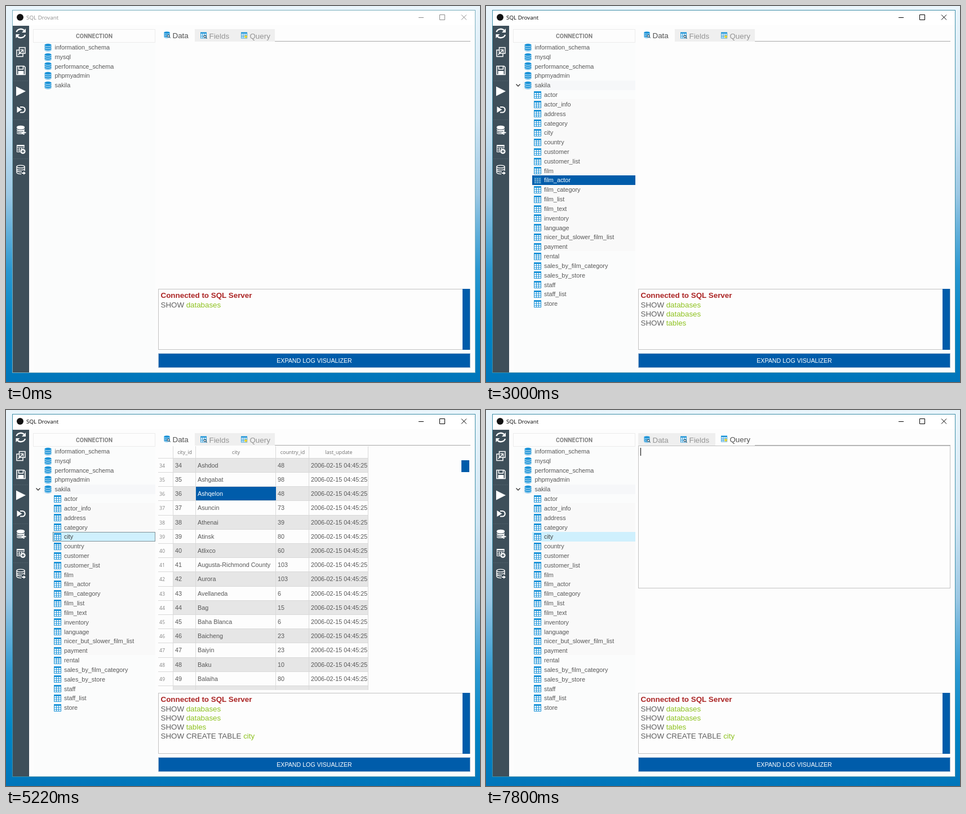
Animation of 841 by 666 pixels, one loop 8 s. Source, as an HTML page:

```html
<!DOCTYPE html>
<html lang="en">
<head>
<meta charset="utf-8">
<title>Database browser</title>
<style>
html, body { margin: 0; width: 841px; height: 666px; overflow: hidden; }
svg { display: block; font-family: "Liberation Sans", Arial, sans-serif; }
text { white-space: pre; }
.ui { font-family: "Open Sans", "Noto Sans", sans-serif; }
.head { font-family: Roboto, sans-serif; font-weight: 700; }
</style>
</head>
<body>
<svg id="stage" width="841" height="666" viewBox="0 0 841 666">
  <defs>
    <linearGradient id="sky" x2="0" y2="1">
      <stop offset="0" stop-color="#eaf5fb"/>
      <stop offset=".3" stop-color="#cfe5f3"/>
      <stop offset=".5" stop-color="#9cc8e4"/>
      <stop offset=".7" stop-color="#2b98d1"/>
      <stop offset=".85" stop-color="#0086c6"/>
      <stop offset="1" stop-color="#0075ba"/>
    </linearGradient>
    <clipPath id="pane"><path d="M270 41H825V496H270Z"/></clipPath>
    <g id="db">
      <path d="M-6 -4.5V4.5A6 2.2 0 0 0 6 4.5V-4.5Z" fill="#1a93d8"/>
      <ellipse cy="-4.5" rx="6" ry="2.2" fill="#1a93d8"/>
      <path d="M-6 -3.6A6 2.2 0 0 0 6 -3.6M-6 -.2A6 2.2 0 0 0 6 -.2M-6 3.2A6 2.2 0 0 0 6 3.2" fill="none" stroke="#fff" stroke-width=".9"/>
    </g>
    <g id="table">
      <rect x="-6.5" y="-6.5" width="13" height="13" fill="#1a93d8"/>
      <path d="M-4 -3.5V5.5M0 -3.5V5.5M4 -3.5V5.5" stroke="#fff" stroke-width="3" stroke-dasharray="2.33 1"/>
    </g>
    <g id="lens" fill="#fff" stroke="#3b5566" stroke-width="1.2">
      <path d="M1.5 1.5L4 4"/><circle r="2.1"/>
    </g>
  </defs>
  <rect width="841" height="666" fill="url(#sky)"/>
  <g id="frame"></g>
  <g id="still"></g>
  <g id="tree"></g>
  <g id="main" clip-path="url(#pane)"></g>
  <g id="log"></g>
</svg>
<script>
const LOOP = 8000, BLUE = '#005caa', GREEN = '#8ec21f', INK = '#585858';
const $ = id => document.getElementById(id);
const esc = s => String(s).replace(/&/g, '&amp;').replace(/</g, '&lt;');
const rect = (x, y, w, h, fill, more = '') =>
  `<rect x="${x}" y="${y}" width="${w}" height="${h}" fill="${fill}" ${more}/>`;
const text = (x, y, s, size, fill, more = '') =>
  `<text x="${x}" y="${y}" font-size="${size}" fill="${fill}" ${more}>${esc(s)}</text>`;
const line = (d, color, more = '') => `<path d="${d}" fill="none" stroke="${color}" ${more}/>`;
const use = (id, x, y, scale = 1) => `<use href="#${id}" transform="translate(${x} ${y}) scale(${scale})"/>`;
const mid = 'text-anchor="middle"';

const bases = 'information_schema mysql performance_schema phpmyadmin sakila'.split(' ');
const tables = ('actor actor_info address category city country customer customer_list film film_actor ' +
  'film_category film_list film_text inventory language nicer_but_slower_film_list payment rental ' +
  'sales_by_film_category sales_by_store staff staff_list store').split(' ');
const cities = ('A Corua (La Corua):87,Abha:82,Abu Dhabi:101,Acua:60,Adana:97,Addis Abeba:31,Aden:107,Adoni:44,' +
  'Ahmadnagar:44,Akishima:50,Akron:103,al-Ayn:101,al-Hawiya:82,al-Manama:11,al-Qadarif:89,al-Qatif:82,' +
  'Alessandria:49,Allappuzha (Alleppey):44,Allende:60,Almirante Brown:6,Alvorada:15,Ambattur:44,Amersfoort:67,' +
  'Amroha:44,Angra dos Reis:15,Anpolis:15,Antofagasta:22,Aparecida de Goinia:15,Apeldoorn:67,Araatuba:15,' +
  'Arak:46,Arecibo:77,Arlington:103,Ashdod:48,Ashgabat:98,Ashqelon:48,Asuncin:73,Athenai:39,Atinsk:80,' +
  'Atlixco:60,Augusta-Richmond County:103,Aurora:103,Avellaneda:6,Bag:15,Baha Blanca:6,Baicheng:23,Baiyin:23,' +
  'Baku:10,Balaiha:80,Balikesir:97,Balurghat:44,Bamenda:19,Bandar Seri Begawan:16,Banjul:37,Barcelona:104,' +
  'Basel:91,Bat Yam:48,Batman:97,Batna:2,Battambang:18').split(',').map((s, i) => {
    const [name, country] = s.split(':');
    return [i + 1, name, country, '2006-02-15 04:45:25'];
  });
const fields = [
  ['city_id', 'smallint(5) unsigned', 'NO', 'PRI', 'None', 'auto_increment'],
  ['city', 'varchar(50)', 'NO', '', 'None', ''],
  ['country_id', 'smallint(5) unsigned', 'NO', 'MUL', 'None', ''],
  ['last_update', 'timestamp', 'NO', '', 'CURRENT_TIMESTAMP', 'on update CURRENT_TIMESTAMP']];
const ddl = [
  'CREATE TABLE `city` (',
  '`city_id` SMALLINT ( 5 ) UNSIGNED NOT NULL AUTO_INCREMENT ,',
  '`city` VARCHAR ( 50 ) NOT NULL ,',
  '`country_id` SMALLINT ( 5 ) UNSIGNED NOT NULL ,',
  '`last_update` timestamp NOT NULL DEFAULT current_timestamp ON UPDATE current_timestamp ,',
  'PRIMARY KEY ( `city_id` ) ,',
  'KEY `idx_fk_country_id` ( `country_id` ) ,',
  'CONSTRAINT `fk_city_country` FOREIGN KEY ( `country_id` ) REFERENCES `country` ( `country_id` ) ON',
  'UPDATE cascade',
  ')',
  'ENGINE = INNODB AUTO_INCREMENT = 601 DEFAULT',
  'CHARSET = UTF8'];

// Timelines: [time, value] steps
const treeHover = [[0, null], [780, -1], [1680, null], [1920, -1], [2040, 0], [2100, 1],
  [2280, 3], [2340, 5], [2400, 7], [2460, 9], [2520, 11], [2580, 13], [2640, 16], [2760, 14],
  [2940, 12], [3000, 9], [3060, 7], [3120, 5], [3180, 3], [3240, 2], [3300, 1], [3480, 2], [3540, 3],
  [3600, 5], [3660, 6], [3720, 8], [3780, 7], [3840, 6], [3900, 5], [3960, 4], [4140, null], [4500, 6], [4620, null]];
const treePick = [[0, null], [1680, -1], [1920, null], [4140, 4]];
const firstRow = [[0, 1], [4800, 4], [4860, 10], [4920, 13], [4980, 19], [5040, 22], [5160, 28], [5220, 34], [5280, 43]];
const cellHover = [[0, ''], [4620, '5,0'], [4680, '2,1'], [5340, '1,1'], [5400, '0,1'], [5460, ''],
  [5940, '0,1'], [6000, '1,1'], [6240, '2,0'], [6420, '3,0'], [6480, ''],
  [6960, '3,1'], [7020, '2,1'], [7080, '1,2'], [7140, '0,3'], [7200, '']];
const tabAt = [[0, 0], [5760, 1], [7440, 2]];
const logCount = [[0, 1], [1860, 2], [1920, 3], [4320, 4]];
const at = (steps, t) => {
  let v = steps[0][1];
  for (const [time, value] of steps) if (t >= time) v = value;
  return v;
};

function frame(active) {
  const c = active ? '#000' : '#8c8c8c';
  return rect(11.5, 7.5, 821, 642, '#fdfdfd', `stroke="${active ? '#3f8fa8' : '#79aebd'}"`) +
    rect(12, 8, 820, 26, '#fff') +
    '<circle cx="25" cy="20" r="6" fill="#111"/>' +
    text(36, 24, 'SQL Drovant', 9.8, c, 'class="ui"') +
    line('M732 20.5H741M769.5 15.5H778.5V24.5H769.5ZM808 15.5L817 24.5M817 15.5L808 24.5', c);
}

function still() {
  const w = (d, width = 1.7) => line(d, '#fff', `stroke-width="${width}"`);
  const solid = d => `<path d="${d}" fill="#fff"/>`;
  const dark = (d, width) => line(d, '#3e4f5a', `stroke-width="${width}"`);
  let s = rect(12, 35, 29, 614, '#3e4f5a');
  for (const y of [132.5, 201.5, 270.5]) s += line(`M13 ${y}H40`, '#4f606b', 'stroke-dasharray="2 1"');
  // refresh, open, save
  s += w('M18.5 46A8 7 0 0 1 32 43M34 51A8 7 0 0 1 20.5 54', 2.4) +
    solid('M35 40V47H28ZM17.5 57V50H24.5Z') +
    w('M23.5 73.5H34V84H23.5ZM23.5 78H19V89.5H30V84.5M21.5 86.5L30 78M25.5 77.5H30.5V82.5', 1.5) +
    w('M19 106.5H32L34 108.5V121.5H19ZM22.5 107V112H30.5V107', 1.6) +
    rect(21.5, 115, 10, 6, '#fff');
  // run, step
  s += solid('M18 142.5L35 151L18 159.5ZM19.5 178L28.5 183.5L19.5 189Z') +
    w('M25 179H29A4.5 4.5 0 0 1 29 188.5H25', 2.2);
  // add database, add table, export
  s += solid('M19 214.5A7 2.7 0 0 1 33 214.5V222H30V227H22Q19 226.5 19 225Z') +
    dark('M19 216.5A7 2.7 0 0 0 33 216.5M19 220A7 2.7 0 0 0 33 220M19 223.5Q22 226 28 225', 1.1) +
    w('M31.5 220.5V228M27.5 224.3H35.5', 2) +
    w('M19.5 246V258.5H27M19.5 247H32V252M19.5 251H32M19.5 255H26M23.5 251V258M27.5 251V254', 1.1) +
    rect(19, 246, 13.5, 2.5, '#fff') +
    '<circle cx="30" cy="257.5" r="4.6" fill="#fff"/>' + dark('M30 255V260M27.5 257.5H32.5', 1.3) +
    '<ellipse cx="26" cy="284.5" rx="7" ry="2.4" fill="none" stroke="#fff" stroke-width="1.4"/>' +
    w('M19 284.5V295Q20 297.5 27 297.500M33 284.5V292M19 288A7 2.6 0 0 0 33 288M19 291.5Q21 294 28 293.8', 1.4) +
    w('M28 296H32', 2) + solid('M31 293L35 296L31 299Z');
  // connection panel, log box, button
  return s + rect(49, 41, 216, 604, '#fbfcfc') +
    rect(48.5, 41.5, 216, 23, '#fdfdfd', 'stroke="#ececec"') +
    text(156.5, 57, 'CONNECTION', 10.4, '#808080', `class="head" ${mid}`) +
    rect(270.5, 501.5, 553, 107, '#fdfdfd', 'stroke="#c2c2c2"') +
    rect(810, 501, 13, 108, BLUE) +
    rect(270.5, 615.5, 553, 25, BLUE, 'stroke="#a9bfd3"') +
    text(547, 632, 'EXPAND LOG VISUALIZER', 10.67, '#fff', mid);
}

function tree(open, hover, pick, dots, worn) {
  let s = open ? rect(65, 132, 200, 17, '#f6f7f9') : '';
  if (worn) s += rect(82, 165, 183, 269, '#f9f9f9');
  if (open) s += line('M53.5 138.5L57 142L60.5 138.5', '#333', 'stroke-width="1.3"');
  // databases count up to -1, tables from 0
  const item = (name, i) => {
    const y = 73.1 + 16.82 * (i + 5), top = Math.round(y - 8.4), base = i < 0;
    const x = base ? 66 : 82, on = i === hover, picked = i === pick;
    let r = '';
    if (on) r += rect(x, top, 265 - x, 17, BLUE);
    if (picked) {
      r += rect(x, top, 265 - x, 17, '#cff0fd');
      if (dots) r += rect(x + 1.5, top + .5, 263 - x, 16, 'none', 'stroke="#333" stroke-dasharray="1 1"');
    }
    const icon = base ? use('db', 74.5, top + 8.5) : use('table', 91.5, top + 8.5);
    r += on && !base ? `<g opacity=".45">${icon}</g>` : icon;
    return r + text(base ? 86.5 : 103, Math.round(y + 3.9), name, 10.85, on ? '#fff' : picked ? '#404040' : INK);
  };
  s += bases.map((name, i) => item(name, i - 5)).join('');
  return open ? s + tables.map(item).join('') : s;
}

function tabs(active) {
  const list = [['Data', 270, 335], ['Fields', 335, 407], ['Query', 407, 477]];
  let s = line('M477 62.5H824', '#a9a9a9');
  list.forEach(([name, x, end], i) => {
    const on = i === active, y = on ? 51.5 : 52.5, ix = x + 15.5;
    if (!on) s += rect(x, 41, end - x, 22, '#efefef');
    s += use(i ? 'table' : 'db', ix, y - .5, .85);
    s += i < 2 ? use('lens', ix + 2.5, y + 1.5, .9)
      : `<path d="M${ix + 3} ${y - 2}l1 2.500l2.500 .300l-2 1.600l.700 2.600l-2.200 -1.500l-2.200 1.500l.700 -2.600l-2 -1.600l2.500 -.300z" fill="#f5d327"/>`;
    s += text(x + 25.5, y + 5.5, name, 13.33, on ? '#505050' : '#949494');
  });
  return s;
}

const rowTop = i => Math.floor(86.3 + 25.2 * i);

function grid(heads, edges, rows, first, hover, cls, size) {
  const right = edges[edges.length - 1], shown = rows.slice(first - 1, first + 16);
  const bottom = rowTop(shown.length) - 1;
  let fills = '', rules = 'M270 85.5H' + right, words = '';
  shown.forEach((cells, i) => {
    const y = rowTop(i), h = rowTop(i + 1) - y - 1, n = first + i;
    if (n % 2 === 0) fills += rect(edges[0], y, right - edges[0], h, '#e6e6e6');
    rules += `M270 ${y + h + .5}H${right}`;
    words += text(272, y + 16, n, 8.9, '#858585', 'class="ui"');
    cells.forEach((c, j) => {
      const on = hover === i + ',' + j;
      if (on) words += rect(edges[j], y, edges[j + 1] - edges[j], h, BLUE);
      words += text(edges[j] + 3, y + 16, c, size, on ? '#fff' : INK, cls);
    });
  });
  for (const x of edges) rules += `M${x - .5} 64V${bottom}`;
  heads.forEach((h, j) =>
    words += text((edges[j] + edges[j + 1]) / 2, 78, h, 8.9, '#707070', `class="ui" ${mid}`));
  return fills + line(rules, '#d9d9d9') + words;
}

function ink(word) {
  if (/[()]/.test(word)) return '#f02020';
  if (/^(\d+|PRIMARY|FOREIGN|KEY|ENGINE|CHARSET)$/.test(word)) return '#5068f0';
  if (/^(SMALLINT|VARCHAR|UNSIGNED|DEFAULT|INNODB|UTF8)$/.test(word)) return '#c352c6';
  return /[a-z]/.test(word) ? GREEN : word === ',' ? '#a0a0a0' : INK;
}

function sql() {
  return rect(270.5, 280.5, 552, 230, '#fdfdfd', 'stroke="#c2c2c2"') + ddl.map((row, i) =>
    `<text x="274.5" y="${Math.round(294.7 + i * 13.42)}" font-size="10.82">` +
    row.split(' ').map(w => `<tspan fill="${ink(w)}">${w} </tspan>`).join('') + '</text>').join('');
}

function main(loaded, caret, tab, first, hover) {
  let s = tabs(tab);
  if (tab === 0 && loaded) {
    s += grid(['city_id', 'city', 'country_id', 'last_update'], [297, 337, 479, 538, 643], cities, first, hover, '', 10.8) +
      rect(808, Math.round(63 + (first - 1) * .79), 14, first > 1 ? 21 : 19, BLUE);
  } else if (tab === 1) {
    s += grid(['Field', 'Type', 'Null', 'Key', 'Default', 'Extra'], [286, 342, 438, 471, 504, 612, 768],
      fields, 1, hover, 'class="ui"', 9.75) + sql();
  } else if (tab === 2) {
    s += rect(270.5, 63.5, 553, 252, '#fdfdfd', 'stroke="#c2c2c2"');
    if (caret) s += line('M274.5 67V81', '#000');
  }
  return s;
}

function log(count) {
  const rows = [['SHOW ', 'databases'], ['SHOW ', 'databases'], ['SHOW ', 'tables'], ['SHOW CREATE TABLE ', 'city']];
  return text(274.5, 517, 'Connected to SQL Server', 13.4, '#ab2424', 'font-weight="700"') +
    rows.slice(0, count).map(([a, b], i) =>
      `<text x="274.5" y="${534 + i * 16}" font-size="13.33" fill="#606060">${a}<tspan fill="${GREEN}">${b}</tspan></text>`).join('');
}

const last = {};
function put(id, make, ...args) {
  const key = args.join('|');
  if (last[id] === key) return;
  last[id] = key;
  $(id).innerHTML = make(...args);
}

function draw(t) {
  put('frame', frame, t >= 1680);
  put('tree', tree, t >= 1920, at(treeHover, t), at(treePick, t), t < 7800, t >= 2760);
  put('main', main, t >= 4500, t >= 7800, at(tabAt, t), at(firstRow, t), at(cellHover, t));
  put('log', log, at(logCount, t));
}

$('still').innerHTML = still();
const start = performance.now();
function tick() {
  draw((performance.now() - start) % LOOP);
  requestAnimationFrame(tick);
}
tick();
</script>
</body>
</html>
```
